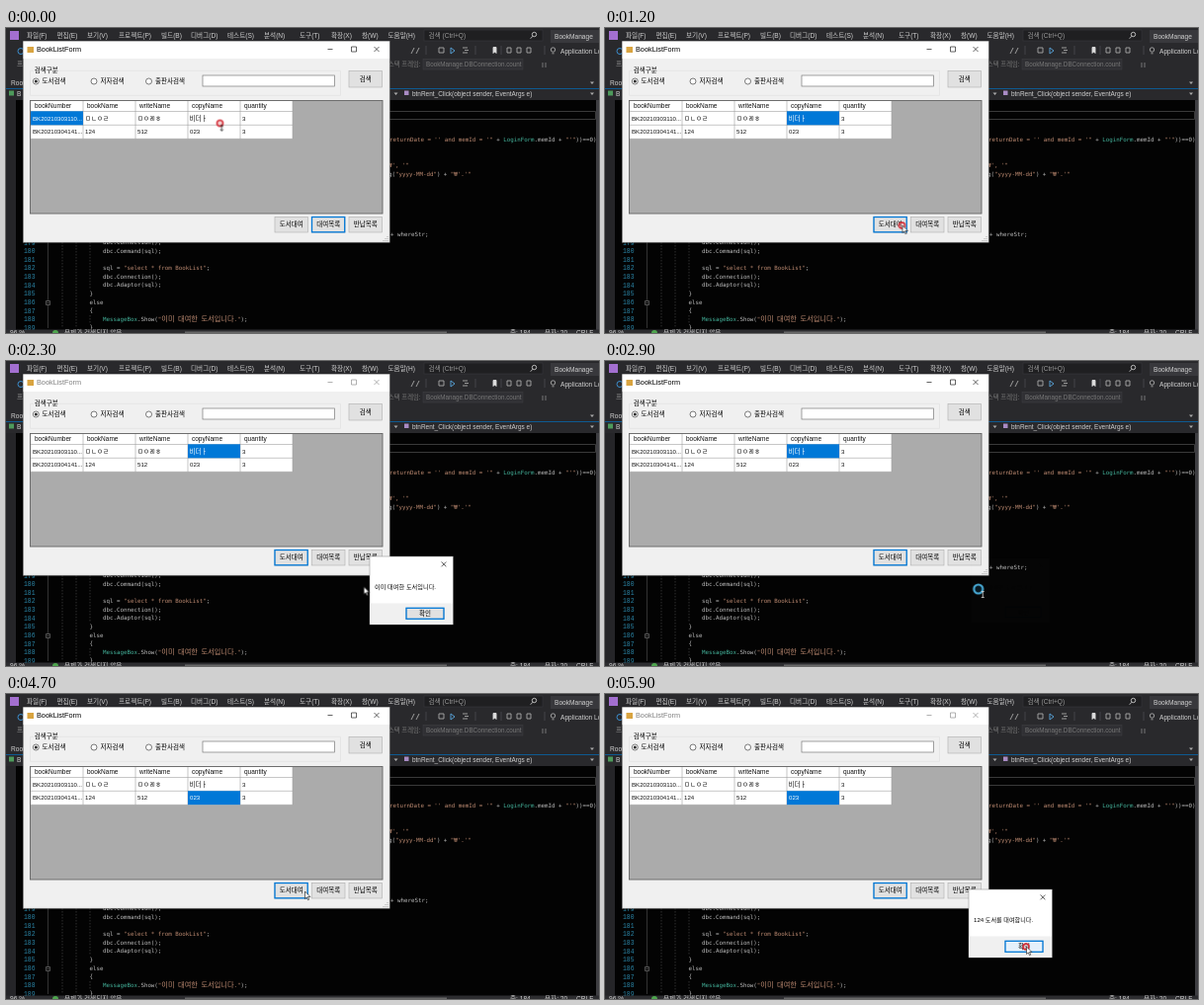
Recreate the animation shown at these times as an HTML page. Size 600x309 px, loop 6000 ms.

```html
<!DOCTYPE html>
<html lang="ko">
<head>
<meta charset="utf-8">
<title>BookListForm</title>
<style>
html, body { margin: 0; width: 100%; height: 100%; overflow: hidden; background: #000; }
svg { display: block; width: 100vw; height: 100vh; }
text { font: 6.5px "Liberation Sans", "Noto Sans CJK KR", sans-serif; white-space: pre; }
.menu text { font-size: 6.6px; fill: #d0d0d0; }
.menu .dim { fill: #777; font-size: 6.3px; }
.code text { font-family: "DejaVu Sans Mono", "Noto Sans CJK KR", monospace; font-size: 5.8px; fill: #bebebe; }
.code .ko { font-size: 7.2px; }
.code .str { fill: #be8b72; }
.code .type { fill: #45b59d; }
.code .num text { font-family: "Liberation Mono", monospace; font-size: 6.4px; fill: #2b86a8; }
.cell { font-size: 6.1px; }
.btn rect { fill: #e1e1e1; stroke: #adadad; stroke-width: .6; }
.btn text { text-anchor: middle; }
.hot { fill: none; stroke: #0078d7; stroke-width: 1.3; }
.sel rect { fill: #0078d7; }
.sel text { fill: #fff; }

.step { animation: 6s step-end infinite; }
.selA { animation-name: selA; }
.selB { animation-name: selB; }
.selC { animation-name: selC; }
.hotRent { animation-name: hotRent; }
.hotList { animation-name: hotList; }
.caption { animation-name: caption; }
.dialog { animation-name: dialog; transform-origin: 410px 232px; }
.msgA { animation-name: msgA; }
.msgB { animation-name: msgB; }
.hotOk { animation-name: hotOk; }
.sizer { animation-name: sizer; }
.beam { animation-name: beam; }
.arrow { animation-name: arrow; }
.busy { animation-name: busy; }
.click { animation-name: click; }
.cursor { animation: move 6s linear infinite; }

@keyframes selA { 0% { opacity: 1 } 1.6%, 100% { opacity: 0 } }
@keyframes selB { 0% { opacity: 0 } 1.6% { opacity: 1 } 66.6%, 100% { opacity: 0 } }
@keyframes selC { 0% { opacity: 0 } 66.6%, 100% { opacity: 1 } }
@keyframes hotRent { 0% { opacity: 0 } 18.3% { opacity: 1 } 66.6% { opacity: 0 } 78.3%, 100% { opacity: 1 } }
@keyframes hotList { 0% { opacity: 1 } 1.6% { opacity: 0 } 16.6% { opacity: 1 } 18.3%, 100% { opacity: 0 } }
@keyframes caption { 0% { opacity: 1 } 28.3% { opacity: .5 } 46.6% { opacity: 1 } 86.6%, 100% { opacity: .5 } }
@keyframes dialog {
  0% { opacity: 0 }
  28.3% { opacity: .82; transform: scale(.985) }
  30% { opacity: 1; transform: none }
  46.6% { opacity: .4; transform: scale(.97) }
  48.3% { opacity: .015; transform: scale(.94) }
  50% { opacity: 0 }
  86.6% { opacity: .7; transform: scale(.98) }
  88.3%, 100% { opacity: 1; transform: none }
}
@keyframes msgA { 0% { opacity: 1 } 60%, 100% { opacity: 0 } }
@keyframes msgB { 0% { opacity: 0 } 60%, 100% { opacity: 1 } }
@keyframes hotOk { 0% { opacity: 0 } 40% { opacity: 1 } 60% { opacity: 0 } 95%, 100% { opacity: 1 } }
@keyframes sizer { 0% { opacity: 1 } 1.6%, 100% { opacity: 0 } }
@keyframes beam { 0% { opacity: 0 } 48.3% { opacity: 1 } 50%, 100% { opacity: 0 } }
@keyframes arrow { 0% { opacity: 0 } 1.6% { opacity: 1 } 48.3% { opacity: 0 } 50%, 100% { opacity: 1 } }
@keyframes busy {
  0% { opacity: 0 } 26.6% { opacity: .5 } 30% { opacity: 0 } 48.3% { opacity: 1 } 50% { opacity: 0 }
  68.3% { opacity: .5 } 70% { opacity: 0 } 85% { opacity: .5 } 88.3%, 100% { opacity: 0 }
}
@keyframes click {
  0% { opacity: 1 } 1.6% { opacity: 0 } 20% { opacity: 1 } 23.3% { opacity: 0 }
  45% { opacity: 1 } 46.6% { opacity: 0 } 66.6% { opacity: 1 } 68.3% { opacity: 0 }
  81.6% { opacity: 1 } 85% { opacity: 0 } 98.3%, 100% { opacity: 1 }
}
@keyframes move {
  0%, 11.6% { transform: translate(216.5px, 96.5px) }
  13.3% { transform: translate(222px, 102px) }
  15% { transform: translate(275px, 150px) }
  16.6% { transform: translate(322px, 194px) }
  18.3% { transform: translate(303px, 200px) }
  20%, 26.6% { transform: translate(300.5px, 200px) }
  28.3% { transform: translate(299px, 201px) }
  36.6% { transform: translate(300px, 202px) }
  38.3% { transform: translate(360px, 228px) }
  40% { transform: translate(415px, 252px) }
  41.6%, 46.6% { transform: translate(424px, 256px) }
  48.3% { transform: translate(379.5px, 232.3px) }
  50% { transform: translate(320px, 190px) }
  51.6% { transform: translate(262px, 145px) }
  53.3% { transform: translate(230px, 118px) }
  55% { transform: translate(220px, 108px) }
  66.6%, 70% { transform: translate(215.5px, 105px) }
  71.6% { transform: translate(222px, 112px) }
  75% { transform: translate(270px, 165px) }
  78.3%, 83.3% { transform: translate(302px, 200px) }
  86.6% { transform: translate(305px, 201px) }
  88.3% { transform: translate(306px, 203px) }
  90% { transform: translate(412px, 226px) }
  91.6% { transform: translate(425px, 232px) }
  95% { transform: translate(425px, 246px) }
  98.3%, 100% { transform: translate(426px, 256px) }
}
</style>
</head>
<body>
<svg viewBox="0 0 600 309" preserveAspectRatio="none">
  <!-- IDE chrome -->
  <rect width="600" height="309" fill="#030303"/>
  <rect width="600" height="73" fill="#29292c"/>
  <rect y="73" width="10" height="236" fill="#252528"/>
  <rect x="597" y="73" width="3" height="234" fill="#3e3e42"/>
  <path d="M0 61.500h600" stroke="#0e5a92"/>
  <rect x="4" y="3" width="9" height="9" fill="#a36fd0"/>
  <g class="menu">
    <text x="21" y="10">파일(F)</text>
    <text x="51.500" y="10">편집(E)</text>
    <text x="82" y="10">보기(V)</text>
    <text x="114" y="10">프로젝트(P)</text>
    <text x="157" y="10">빌드(B)</text>
    <text x="187" y="10">디버그(D)</text>
    <text x="224" y="10">테스트(S)</text>
    <text x="261" y="10">분석(N)</text>
    <text x="297" y="10">도구(T)</text>
    <text x="329" y="10">확장(X)</text>
    <text x="360" y="10">창(W)</text>
    <text x="386.500" y="10">도움말(H)</text>
    <rect x="423" y="2" width="120" height="11" fill="#1f1f21" stroke="#38383c" stroke-width=".6"/>
    <text x="427.500" y="10" style="fill:#999">검색 (Ctrl+Q)</text>
    <g fill="none" stroke="#ccc" stroke-width=".9">
      <circle cx="534.500" cy="6.500" r="2.200"/><path d="M533 8.200l-2.300 2.500"/>
    </g>
    <rect x="551" y="2" width="49" height="13" fill="#38383c"/>
    <text x="555" y="11">BookManage</text>
    <circle cx="15" cy="23.500" r="3" fill="none" stroke="#3b8fd0"/>
    <text x="561" y="25.500">Application Lo</text>
    <g fill="none" stroke="#aaa" stroke-width=".9">
      <circle cx="553.500" cy="22" r="2.200"/><path d="M552.500 25.800h2"/>
      <path d="M410 26l3-6M415 26l3-6M438 20h5v5h-5zM462 20h5M464 22.500h4M462 25h5M507 20h4v5h-4zM517 20h4v5h-4zM527 20h4v5h-4z"/>
      <path d="M450 20v6l4-3z" stroke="#5aa9e0"/>
      <path d="M493 19.500h3v6l-1.500-1.500-1.500 1.500z" fill="#ddd" stroke="#ddd"/>
      <path d="M425 18v9M475 18v9M501 18v9M545 18v9" stroke="#48484c"/>
    </g>
    <text x="11" y="39" style="fill:#999">프</text>
    <text x="387" y="39" class="dim">스택 프레임:</text>
    <rect x="422" y="31.500" width="101" height="10.500" fill="#303034" stroke="#3e3e42" stroke-width=".6"/>
    <text x="425" y="39" class="dim">BookManage.DBConnection.count</text>
    <path d="M543 35v5M546 35v5" stroke="#777"/>
    <text x="5" y="58">Root</text>
    <path d="M591 54.500h4l-2 2.500z" fill="#aaa"/>
    <rect x="3" y="63.500" width="5" height="5" fill="#4d9a5b"/>
    <text x="11" y="68.500">B</text>
    <path d="M392.500 65.500h4l-2 2.500zM591 65.500h4l-2 2.500z" fill="#aaa"/>
    <rect x="403" y="63.500" width="4.500" height="4.500" fill="#a98bc4"/>
    <text x="411" y="68.500" style="font-size:6.45px">btnRent_Click(object sender, EventArgs e)</text>
  </g>

  <!-- editor -->
  <path d="M388 84.500h208.500v8h-208.500" fill="none" stroke="#404040" stroke-width=".9"/>
  <path d="M42.500 217v87" stroke="#555" stroke-width=".6"/>
  <path d="M57 217v87M71 217v87M85 217v48M85 291v9" stroke="#505050" stroke-width=".6" stroke-dasharray="1.500 1.500"/>
  <path d="M40.500 276.500h4v4h-4zM41.500 278.500h2" fill="#030303" stroke="#888" stroke-width=".6"/>
  <g class="code" transform="translate(0 -.6)">
    <g class="num">
      <text x="18" y="220.500">179</text>
      <text x="18" y="229">180</text>
      <text x="18" y="237.500">181</text>
      <text x="18" y="246">182</text>
      <text x="18" y="254.700">183</text>
      <text x="18" y="263.400">184</text>
      <text x="18" y="272">185</text>
      <text x="18" y="280.600">186</text>
      <text x="18" y="289.300">187</text>
      <text x="18" y="298">188</text>
      <text x="18" y="306.500">189</text>
    </g>
    <text x="98" y="220">dbc.Connection();</text>
    <text x="98" y="228.500">dbc.Command(sql);</text>
    <text x="98" y="246">sql = <tspan class="str">"select * from BookList"</tspan>;</text>
    <text x="98" y="254.500">dbc.Connection();</text>
    <text x="98" y="263">dbc.Adaptor(sql);</text>
    <text x="84.500" y="271.500">}</text>
    <text x="84.500" y="280.500">else</text>
    <text x="84.500" y="289">{</text>
    <text x="98" y="297.800"><tspan class="type">MessageBox</tspan>.Show(<tspan class="str">"<tspan class="ko">이미</tspan> <tspan class="ko">대여한</tspan> <tspan class="ko">도서입니다</tspan>."</tspan>);</text>
    <text x="84.500" y="306">}</text>
    <text x="388" y="116"><tspan class="str">returnDate = '' and memId = '"</tspan> + <tspan class="type">LoginForm</tspan>.memId + <tspan class="str">"'"</tspan>))==0)</text>
    <text x="387" y="142"><tspan class="str">₩', '"</tspan></text>
    <text x="387" y="150.500">g(<tspan class="str">"yyyy-MM-dd"</tspan>) + <tspan class="str">"₩'.'"</tspan></text>
    <text x="389" y="211.500">+ whereStr;</text>
  </g>
  <rect y="305.500" width="600" height="4" fill="#2d2d30"/>
  <rect x="181" y="307.500" width="265" height="2" fill="#686868"/>
  <g class="menu">
    <text x="4" y="311">96 %</text>
    <circle cx="50" cy="309" r="3" fill="#4ea64e"/>
    <text x="59" y="311">문제가 검색되지 않음</text>
    <text x="510" y="311">줄: 184</text>
    <text x="545" y="311">문자: 20</text>
    <text x="577" y="311">CRLF</text>
  </g>

  <!-- form window -->
  <rect x="17.300" y="13.300" width="370.900" height="203.900" fill="#f0f0f0" stroke="#777" stroke-width=".6"/>
  <rect x="17.600" y="13.600" width="370.300" height="17.400" fill="#fff"/>
  <rect x="21.500" y="19" width="6.500" height="6" fill="#d9a441"/>
  <g class="step caption">
    <text x="31" y="24" style="font-size:7.3px">BookListForm</text>
    <path d="M325.500 21.500h5M349.500 19h5v5h-5zM372.500 19l5 5m0-5l-5 5" fill="none" stroke="#222" stroke-width=".7"/>
  </g>
  <path d="M28 43.300h-3.500v25h314v-25h-285" fill="none" stroke="#e2e2e2" stroke-width=".8"/>
  <text x="28.700" y="45.300">검색구분</text>
  <g fill="#fff" stroke="#444" stroke-width=".7">
    <circle cx="30.300" cy="54" r="3"/><circle cx="89" cy="54" r="3"/><circle cx="144.500" cy="54" r="3"/>
  </g>
  <circle cx="30.300" cy="54" r="1.500" fill="#222"/>
  <text x="36.500" y="56.300">도서검색</text>
  <text x="95.500" y="56.300">저자검색</text>
  <text x="151" y="56.300">출판사검색</text>
  <rect x="199" y="48" width="133.500" height="11" fill="#fff" stroke="#7a7a7a" stroke-width=".7"/>

  <!-- grid -->
  <rect x="24.500" y="73.500" width="356.500" height="114.500" fill="#ababab" stroke="#646464" stroke-width=".9"/>
  <rect x="25" y="74" width="265" height="38.300" fill="#fff"/>
  <path d="M25 84.500h265M25 98.300h265M25 112.300h265M78 74v38.300M131 74v38.300M184 74v38.300M237 74v38.300M290 74v38.300" stroke="#a0a0a0" stroke-width=".6"/>
  <g fill="#111">
    <text x="29" y="81">bookNumber</text>
    <text x="82" y="81">bookName</text>
    <text x="135" y="81">writeName</text>
    <text x="188" y="81">copyName</text>
    <text x="241" y="81">quantity</text>
    <text class="cell" x="27" y="93.500">BK20210303110...</text>
    <text x="80" y="93.500">ㅁㄴㅇㄹ</text>
    <text x="133" y="93.500">ㅁㅇㄻㅎ</text>
    <text x="185.500" y="93.500">비더ㅏ</text>
    <text class="cell" x="239" y="93.500">3</text>
    <text class="cell" x="27" y="107.400">BK20210304141...</text>
    <text class="cell" x="80" y="107.400">124</text>
    <text class="cell" x="133" y="107.400">512</text>
    <text class="cell" x="186" y="107.400">023</text>
    <text class="cell" x="239" y="107.400">3</text>
  </g>
  <g class="sel step selA"><rect x="25" y="84.300" width="53" height="14"/><text class="cell" x="27" y="93.500">BK20210303110...</text></g>
  <g class="sel step selB"><rect x="184" y="84.300" width="53" height="14"/><text x="185.500" y="93.500">비더ㅏ</text></g>
  <g class="sel step selC"><rect x="184" y="98.200" width="53" height="14"/><text class="cell" x="186" y="107.400">023</text></g>

  <g class="btn">
    <rect x="347" y="43.500" width="33.500" height="16.500"/><text x="363.700" y="54.200">검색</text>
    <rect x="272" y="191.300" width="33.500" height="15.700"/><text x="288.700" y="201.200">도서대여</text>
    <rect x="309.500" y="191.300" width="33.500" height="15.700"/><text x="326.200" y="201.200">대여목록</text>
    <rect x="347" y="191.300" width="33.500" height="15.700"/><text x="363.700" y="201.200">반납목록</text>
  </g>
  <rect class="hot step hotRent" x="272" y="191.500" width="33.200" height="15.300"/>
  <rect class="hot step hotList" x="309.500" y="191.500" width="33.200" height="15.300"/>
  <path d="M386 211v5M384 213v3M382 215v1" stroke="#aaa" stroke-dasharray="1 1"/>

  <!-- message box -->
  <g class="step dialog">
    <rect x="368" y="198" width="84.300" height="69" fill="#fff" stroke="#888" stroke-width=".5"/>
    <rect x="368.300" y="245.500" width="83.700" height="21.200" fill="#f0f0f0"/>
    <path d="M440.500 203.500l4.800 4.800m0-4.800l-4.800 4.800" stroke="#222" stroke-width=".7"/>
    <text class="step msgA" x="373" y="231" style="font-size:6.2px">이미 대여한 도서입니다.</text>
    <text class="step msgB" x="373" y="231" style="font-size:6.1px">124 도서를 대여합니다.</text>
    <g class="btn"><rect x="405" y="250.300" width="38" height="11"/></g>
    <rect class="step hotOk" x="405" y="250.300" width="38" height="11" fill="#e5f1fb"/>
    <rect class="hot" x="405" y="250.300" width="38" height="11"/>
    <g class="btn"><text x="424" y="258.300">확인</text></g>
  </g>

  <!-- pointer -->
  <g class="cursor">
    <circle class="step click" r="3" fill="#e8a0a0" fill-opacity=".5" stroke="#d42a35" stroke-width="1.500"/>
    <circle class="step busy" r="4.500" fill="#0c3a50" fill-opacity=".4" stroke="#48a9d4" stroke-width="2.200"/>
    <path class="step sizer" d="M1.800 1.800v6M.3 3.300l1.500-1.600 1.500 1.600M.3 6.300l1.500 1.600 1.500-1.600" fill="none" stroke="#222" stroke-width=".8"/>
    <path class="step beam" d="M3 2.500h3M4.500 2.500v6M3 8.500h3" fill="none" stroke="#ddd" stroke-width=".8"/>
    <path class="step arrow" d="M.5 0v7.500l1.800-1.600 1.200 2.800 1.200-.5-1.200-2.700h2.400z" fill="#fff" stroke="#111" stroke-width=".6"/>
  </g>
</svg>
</body>
</html>
```
